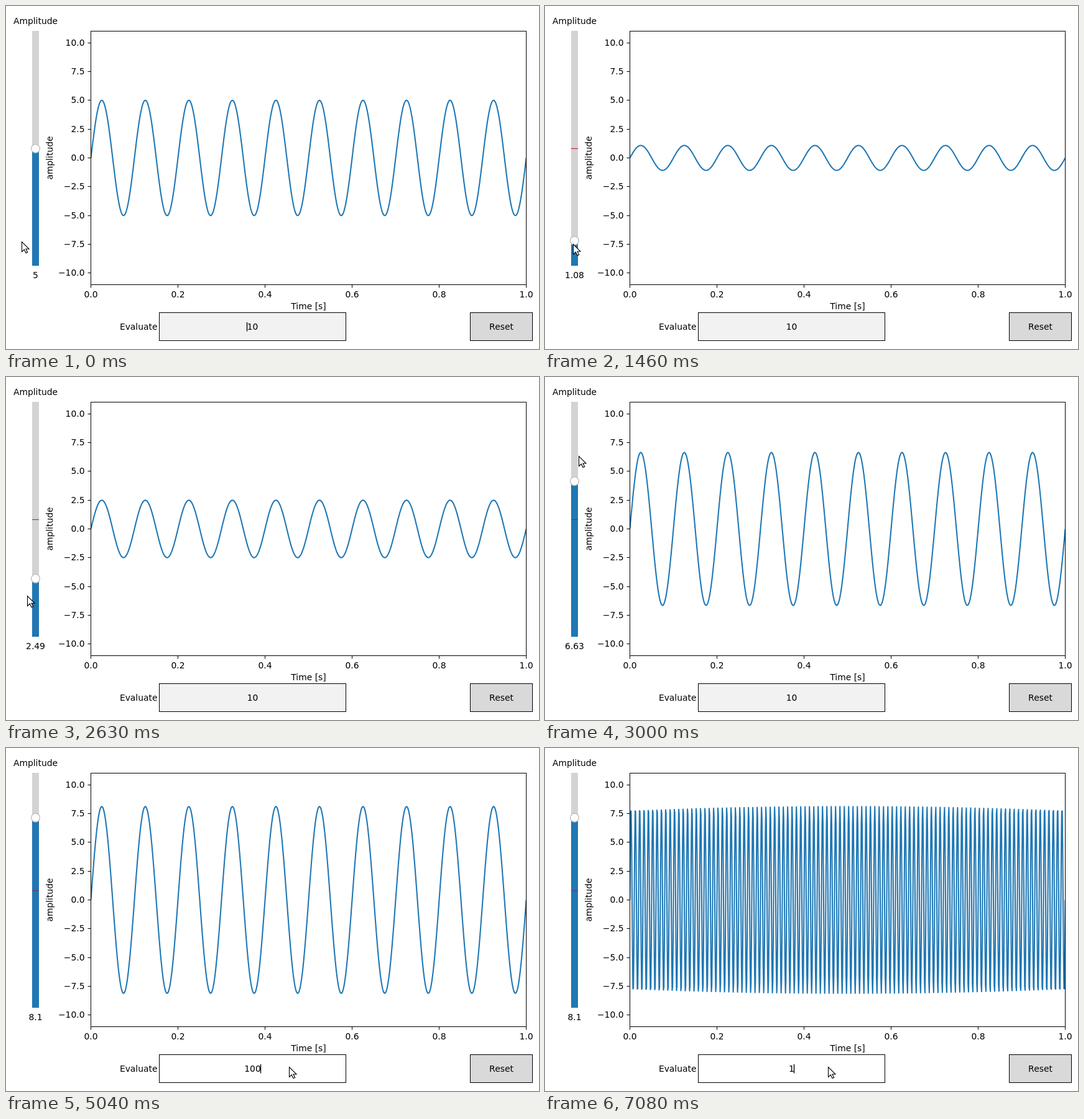
An HTML page with a canvas for the animation above (8 s loop, 857 by 552 pixels).

```html
<!DOCTYPE html>
<html>
<head>
<meta charset="utf-8">
<title>Sine wave with slider</title>
<style>
html, body { margin: 0; width: 857px; height: 552px; overflow: hidden; background: #fff; }
canvas { display: block; }
</style>
</head>
<body>
<canvas id="stage" width="857" height="552"></canvas>
<script>
const ctx = document.getElementById('stage').getContext('2d');
const BLUE = '#1f77b4', LOOP = 8000, FPS = 24;
const plot = { x: 136.5, y: 40.5, w: 700, h: 408 };
const midY = plot.y + plot.h / 2, unit = plot.h / 22;
const track = { x: 42, top: 40, bottom: 418, w: 11 };
const DRAG_START = 17, DRAG_END = 73;

// Pointer path: [step, x, y]
const path = [
  [0, 25, 379], [6, 64, 310], [14, 48, 229], [17, 48, 229],
  [34, 45, 377.2], [35, 45, 383], [37, 47, 390], [45, 58, 260],
  [51, 66, 120.1], [52, 67, 99], [57, 60, 70.3], [62, 36, 323.9],
  [63, 34, 352], [66, 35, 392], [73, 60, 111.8], [77, 172, 357],
  [83, 320, 530], [89, 455, 513]
];
const arrow = new Path2D('M.5 .5V16.5L4.3 13L7 18.6L9.7 17.4L7 12H12Z');

const slope = (i, c) =>
  path[i] && path[i + 1] ? (path[i + 1][c] - path[i][c]) / (path[i + 1][0] - path[i][0]) : 0;

// Monotone tangent, zero at turning points
function tangent(i, c) {
  const a = slope(i - 1, c), b = slope(i, c);
  return a * b > 0 ? 2 * a * b / (a + b) : 0;
}

function pointer(step) {
  const last = path.length - 1;
  if (step >= path[last][0]) return path[last].slice(1);
  const i = path.findIndex(k => k[0] > step) - 1;
  const span = path[i + 1][0] - path[i][0], u = (step - path[i][0]) / span;
  const ease = u * u * (3 - 2 * u);
  return [1, 2].map(c =>
    path[i][c] + (path[i + 1][c] - path[i][c]) * ease +
    span * u * (1 - u) * ((1 - u) * tangent(i, c) - u * tangent(i + 1, c)));
}

function text(s, x, y, align = 'center') {
  ctx.fillStyle = '#000';
  ctx.textAlign = align;
  ctx.fillText(s, x, y);
}

function line(x1, y1, x2, y2, width = 1, color = '#000') {
  ctx.strokeStyle = color;
  ctx.lineWidth = width;
  ctx.beginPath();
  ctx.moveTo(x1, y1);
  ctx.lineTo(x2, y2);
  ctx.stroke();
}

function box(x, y, w, h, fill) {
  ctx.fillStyle = fill;
  ctx.fillRect(x, y, w, h);
  ctx.strokeStyle = '#000';
  ctx.lineWidth = 1;
  ctx.strokeRect(x, y, w, h);
}

function drawWave(amp, freq) {
  ctx.save();
  ctx.beginPath();
  ctx.rect(plot.x, plot.y, plot.w, plot.h);
  ctx.clip();
  ctx.beginPath();
  for (let i = 0; i < 1000; i++) {
    const t = i / 999;
    ctx.lineTo(plot.x + plot.w * t, midY - unit * amp * Math.sin(2 * Math.PI * freq * t));
  }
  ctx.strokeStyle = BLUE;
  ctx.lineWidth = 2.08;
  ctx.lineJoin = 'round';
  ctx.stroke();
  ctx.restore();
}

function drawAxes() {
  ctx.strokeStyle = '#000';
  ctx.lineWidth = 1;
  ctx.strokeRect(plot.x, plot.y, plot.w, plot.h);
  const bottom = plot.y + plot.h;
  for (let i = 0; i <= 5; i++) {
    const x = plot.x + plot.w * i / 5;
    line(x, bottom, x, bottom + 5);
    text((i / 5).toFixed(1), x, 469);
  }
  for (let v = -10; v <= 10; v += 2.5) {
    const y = Math.floor(midY - unit * v) + .5;
    line(plot.x - 5, y, plot.x, y);
    text(v.toFixed(1).replace('-', '\u2212'), 126.5, y + 4.5, 'right');
  }
  text('Time [s]', 486.5, 488);
  ctx.save();
  ctx.translate(75, midY);
  ctx.rotate(-Math.PI / 2);
  text('amplitude', 0, 0);
  ctx.restore();
}

function drawSlider(value, y) {
  text('Amplitude', 47.5, 29);
  ctx.fillStyle = '#d3d3d3';
  ctx.fillRect(track.x, track.top, track.w, track.bottom - track.top);
  ctx.fillStyle = BLUE;
  ctx.fillRect(track.x, y, track.w, track.bottom - y);
  line(track.x, 229.5, track.x + track.w, 229.5, 1.2, y < 229 ? '#6a3a6c' : '#d0282c');
  ctx.beginPath();
  ctx.arc(47.5, y + .4, 6.9, 0, 7);
  ctx.fillStyle = '#fff';
  ctx.fill();
  ctx.strokeStyle = '#bfbfbf';
  ctx.lineWidth = 1.39;
  ctx.stroke();
  text(String(+value.toFixed(2)), 47.5, 437.5);
}

function drawInput(step, hover) {
  const entry = step < 121 ? '10' : step < 163 ? '100' : step < 170 ? '10' : '1';
  text('Evaluate', 243.5, 520.5, 'right');
  box(246.5, 493.5, 300, 45, hover ? '#fff' : '#f2f2f2');
  text(entry, 396.5, 520.5);
  if (step < 18 || step >= 92) {
    const half = ctx.measureText(entry).width / 2;
    const x = Math.floor(396.5 + (step < 18 ? -half : half)) + .5;
    line(x, 509, x, 523.5, 1.39);
  }
}

function draw(now) {
  const step = Math.floor((now % LOOP + 5) * FPS / 1000);
  const [px, py] = pointer(step);
  // The knob trails the pointer by one step
  const knobY = pointer(Math.min(Math.max(step - 1, DRAG_START), DRAG_END))[1];
  const value = (track.bottom - knobY) / 37.8;
  const hover = px > 246 && px < 547 && py > 493 && py < 539;

  ctx.fillStyle = '#fff';
  ctx.fillRect(0, 0, 857, 552);
  ctx.font = '13.89px "DejaVu Sans", sans-serif';
  drawWave(value, step < 144 ? 10 : 100);
  drawAxes();
  drawSlider(value, knobY);
  drawInput(step, hover);
  box(746.5, 493.5, 100, 45, '#d9d9d9');
  text('Reset', 796.5, 520.5);

  ctx.save();
  ctx.translate(Math.round(px), Math.round(py));
  ctx.fillStyle = '#fff';
  ctx.fill(arrow);
  ctx.strokeStyle = '#000';
  ctx.lineWidth = 1.1;
  ctx.stroke(arrow);
  ctx.restore();
}

const start = performance.now();
function tick() {
  draw(performance.now() - start);
  requestAnimationFrame(tick);
}
tick();
</script>
</body>
</html>
```
